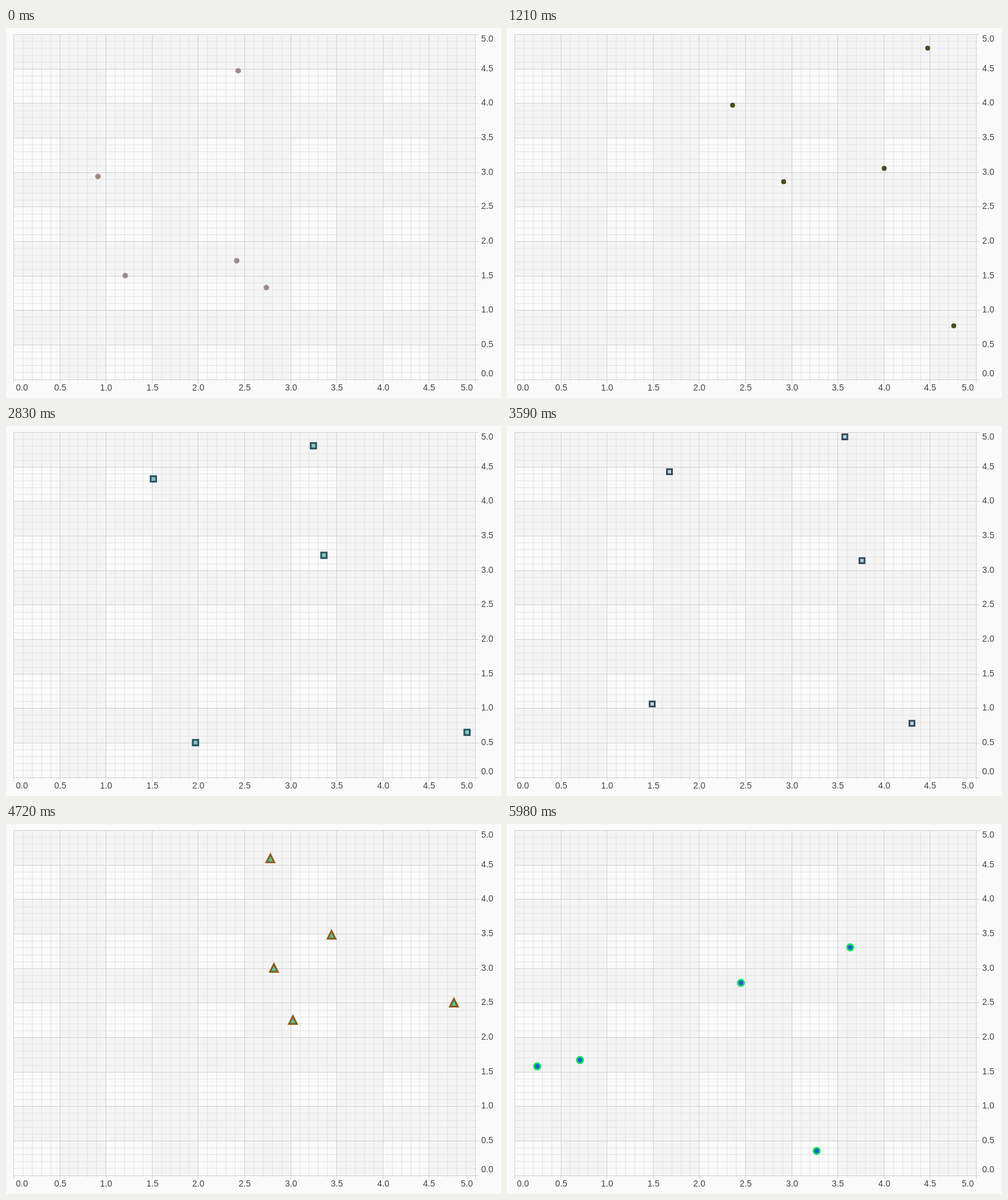
Animation, 800 px wide and 597 px high, one loop 6300 ms. Source, as an HTML page with a canvas:

```html
<!DOCTYPE html>
<html lang="en">
<head>
<meta charset="utf-8">
<title>Animated scatter chart</title>
<style>
  html, body { margin: 0; height: 100%; overflow: hidden; background: #fafafa; }
  canvas { display: block; }
</style>
</head>
<body>
<canvas id="chart" width="800" height="597"></canvas>
<script>
const ctx = document.getElementById('chart').getContext('2d');
const LOOP = 6300, DURATION = 500, CADENCE = 975, FIRST_START = -343;
const LEFT = 12, TOP = 10.2, WIDTH = 746, HEIGHT = 556.4, LINE = 2.8;

// Axis units (0 to 5) to pixels
const toX = v => LEFT + v * WIDTH / 5;
const toY = v => TOP + HEIGHT - v * HEIGHT / 5;

// Data sets in axis units; each tweens into the next, and the last into the first.
const poses = [
  { shape: 'circle', r: 4.3, stroke: '#af8791', fill: '#ad7f71',
    x: [1.316, 2.643, 2.345, 0.75, 2.604], y: [1.494, 1.115, 4.918, 2.956, 1.723] },
  { shape: 'circle', r: 4, stroke: '#4d4a1c', fill: '#6b3a2a',
    x: [2.916, 4.759, 4.477, 2.363, 4.005], y: [2.863, 0.774, 4.8, 3.973, 3.056] },
  { shape: 'square', r: 7, stroke: '#049e64', fill: '#235444',
    x: [1.226, 4.568, 4.938, 1.891, 2.684], y: [4.198, 0.216, 0.47, 3.319, 3.328] },
  { shape: 'square', r: 5.4, stroke: '#323c5f', fill: '#aee8e3',
    x: [3.931, 1.098, 4.906, 1.39, 3.592], y: [5.01, 0.597, 0.711, 4.663, 3.18] },
  { shape: 'square', r: 6, stroke: '#36963c', fill: '#be64ff',
    x: [1.253, 4.101, 0.338, 3.591, 4.91], y: [4.439, 4.131, 1.239, 2.882, 2.877] },
  { shape: 'triangle', r: 8.9, stroke: '#bf3400', fill: '#1af764',
    x: [3.749, 3.032, 4.389, 2.672, 4.684], y: [4.691, 3.077, 4.119, 1.85, 2.265] },
  { shape: 'circle', r: 6.5, stroke: '#14e060', fill: '#1860d0',
    x: [0.237, 3.639, 3.271, 2.453, 0.699], y: [1.569, 3.303, 0.342, 2.791, 1.668] }
];

const clamp = (v, min, max) => Math.min(max, Math.max(min, v));
const outQuad = t => 1 - (1 - t) ** 2;
const mix = (a, b, p) => a + (b - a) * p;
const channels = hex => [1, 3, 5].map(i => parseInt(hex.slice(i, i + 2), 16));

function mixColor(a, b, p) {
  const end = channels(b);
  return `rgb(${channels(a).map((v, i) => Math.round(mix(v, end[i], p)))})`;
}

function drawGrid(color, tick, isShown) {
  ctx.fillStyle = color;
  for (let i = 0; i <= 50; i++) {
    if (!isShown(i)) continue;
    ctx.fillRect(Math.round(toX(i / 10)), 10, 1, 557 + tick);
    ctx.fillRect(LEFT, Math.round(toY(i / 10)), WIDTH + tick, 1);
  }
}

function drawAxes() {
  ctx.fillStyle = '#fafafa';
  ctx.fillRect(0, 0, 800, 597);
  ctx.fillStyle = '#f4f4f4';
  for (let i = 0; i < 5; i++) {
    ctx.fillRect(Math.round(toX(i + 0.5)), 10, 75, 557);
    ctx.fillRect(LEFT, Math.round(toY(i + 1)), WIDTH, 56);
  }
  drawGrid('#e4e4e4', 3, i => i % 5);
  drawGrid('#d1d1d1', 6, i => i % 5 === 0);

  ctx.fillStyle = '#444';
  ctx.font = '14px "Liberation Sans", Arial, sans-serif';
  for (let v = 0; v <= 5; v += 0.5) {
    ctx.fillText(v.toFixed(1), clamp(Math.round(toX(v)) - 9, 16, 735), 585);
    ctx.fillText(v.toFixed(1), 768, clamp(Math.round(toY(v)) + 4, 22, 562));
  }
}

function drawMarker(shape, x, y, r) {
  ctx.beginPath();
  if (shape === 'circle') ctx.arc(x, y, r, 0, 2 * Math.PI);
  else if (shape === 'square') ctx.rect(x - r, y - r, 2 * r, 2 * r);
  else {
    ctx.moveTo(x, y - r);
    ctx.lineTo(x + r, y + r);
    ctx.lineTo(x - r, y + r);
    ctx.closePath();
  }
  ctx.fill();
  ctx.stroke();
}

function draw(time) {
  const elapsed = time - FIRST_START;
  const index = Math.floor(elapsed / CADENCE);
  const progress = outQuad(Math.min(1, elapsed % CADENCE / DURATION));
  const from = poses.at(index - 1), to = poses[index];

  drawAxes();
  ctx.save();
  ctx.beginPath();
  ctx.rect(LEFT, 10, WIDTH, 558);
  ctx.clip();
  ctx.fillStyle = mixColor(from.fill, to.fill, progress);
  ctx.strokeStyle = mixColor(from.stroke, to.stroke, progress);
  ctx.lineWidth = LINE;
  const radius = mix(from.r, to.r, progress) - LINE / 2;
  to.x.forEach((x, i) => drawMarker(to.shape,
    toX(mix(from.x[i], x, progress)),
    toY(mix(from.y[i], to.y[i], progress)), radius));
  ctx.restore();
}

function tick() {
  draw(performance.now() % LOOP);
  requestAnimationFrame(tick);
}
tick();
</script>
</body>
</html>
```
